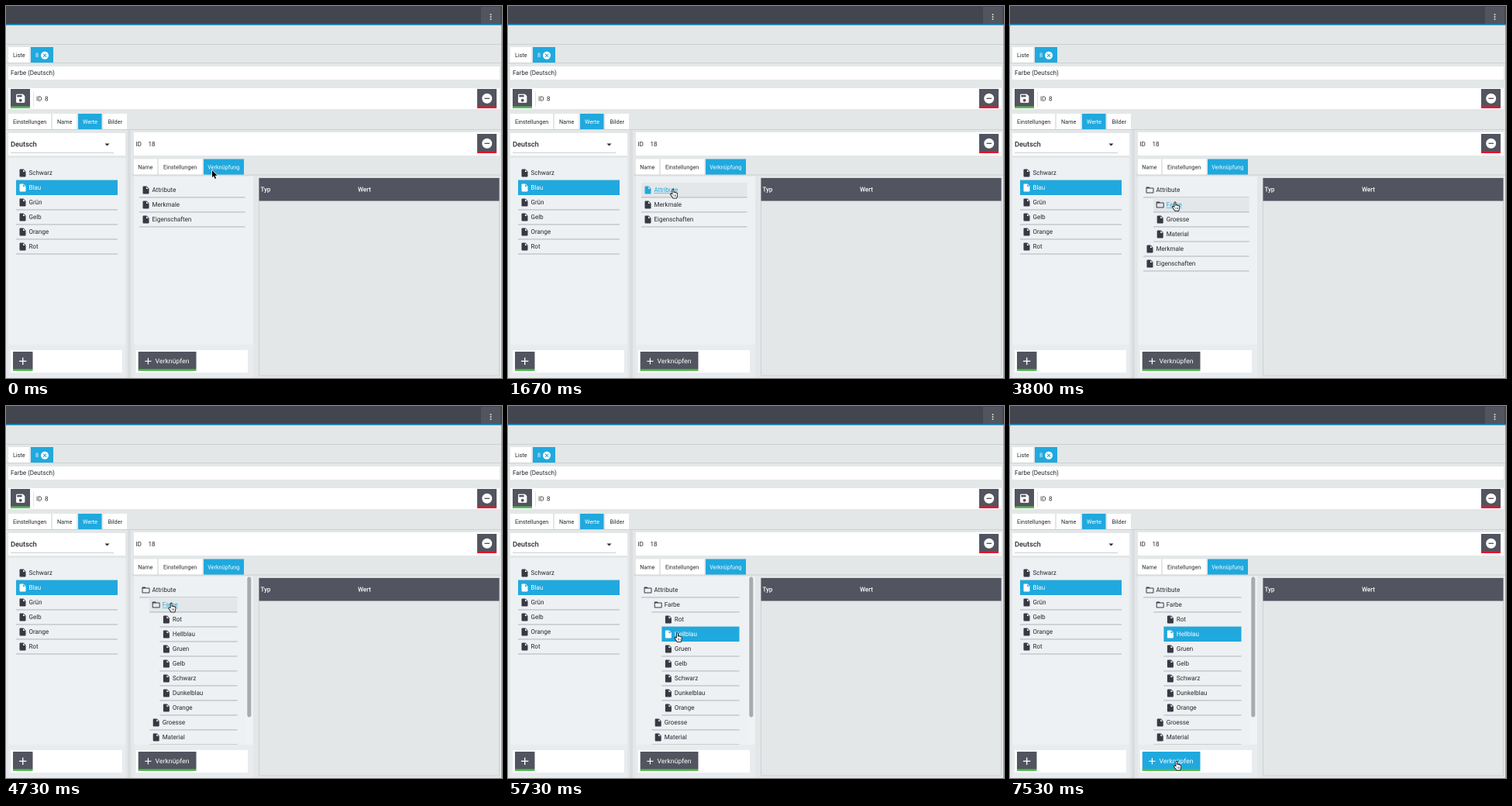
An HTML page with a canvas for the animation above (8000 ms loop, 640 by 480 pixels).

```html
<!DOCTYPE html>
<html lang="de">
<head>
<meta charset="utf-8">
<title>Verknüpfung</title>
<style>
html, body { margin: 0; width: 100%; height: 100%; overflow: hidden; background: #e3e7e8; }
canvas { display: block; width: 640px; height: 480px; }
</style>
</head>
<body>
<canvas id="stage" width="1280" height="960"></canvas>
<script>
const ctx = document.getElementById('stage').getContext('2d');
ctx.scale(2, 2); // drawn at double size for soft, unhinted text
const BLUE = '#20a9de', DARK = '#52545f', INK = '#27282d', SIGN = '#383a43', BACK = '#e3e7e8',
  PANEL = '#edf1f4', LINE = '#abaeb1', EDGE = '#cdd1d3', GREEN = '#55bd52', RED = '#e8122b';
const FPS = 15, FRAMES = 120;

// Icons on a 24 unit grid
const ICON = {
  file: 'M6 2c-1.1 0-2 .9-2 2v16c0 1.1.9 2 2 2h12c1.1 0 2-.9 2-2V8l-6-6H6zm7 7V3.5L18.5 9H13z',
  folder: 'M20 6h-8l-2-2H4c-1.1 0-2 .9-2 2v12c0 1.1.9 2 2 2h16c1.1 0 2-.9 2-2V8c0-1.1-.9-2-2-2zm0 12H4V8h16v10z',
  save: 'M17 3H5c-1.1 0-2 .9-2 2v14c0 1.1.9 2 2 2h14c1.1 0 2-.9 2-2V7l-4-4zm-5 16a3 3 0 1 1 0-6 3 3 0 0 1 0 6zm3-10H5V5h10v4z',
  minus: 'M12 2a10 10 0 1 0 0 20 10 10 0 0 0 0-20zm5 11H7v-2h10v2z',
  plus: 'M19 13h-6v6h-2v-6H5v-2h6V5h2v6h6v2z',
  close: 'M12 2a10 10 0 1 0 0 20 10 10 0 0 0 0-20zm5 13.6L15.6 17 12 13.4 8.4 17 7 15.6 10.6 12 7 8.4 8.4 7 12 10.6 15.6 7 17 8.4 13.4 12z',
  dots: 'M12 8a2 2 0 1 0 0-4 2 2 0 0 0 0 4zm0 2a2 2 0 1 0 0 4 2 2 0 0 0 0-4zm0 6a2 2 0 1 0 0 4 2 2 0 0 0 0-4z'
};
for (const k in ICON) ICON[k] = new Path2D(ICON[k]);
const HAND = new Path2D('M3 7V1.3a.9.9 0 0 1 1.8 0V5l.2-.5a.8.8 0 0 1 1.5.2l.2.3a.8.8 0 0 1 1.4.3l.2.2a.8.8 0 0 1 1.3.6V8.5L8.6 12H4L.7 7.5a.9.9 0 0 1 1.3-1.2z');
const ARROW = new Path2D('M0 0V9.2L2.1 7.3 3.7 11 5.2 10.4 3.6 6.8H6.5z');

// Pointer moves: first and last frame, end point, time warp, sideways bow
const START = { x: 266, y: 212 };
const MOVES = [
  { from: 15, to: 25, x: 213, y: 236, warp: 1, bow: 0 },
  { from: 47, to: 51, x: 213, y: 252.5, warp: 1, bow: 0 },
  { from: 71, to: 79, x: 218.5, y: 292.5, warp: 1, bow: 0 },
  { from: 101, to: 113, x: 215, y: 458, warp: 0.8, bow: 3.3 }
];
const OPEN_ICON = 34, OPEN = 36, SUB_ICON = 57, SUB_OPEN = 60, PICK = 86;

function box(x, y, w, h, color) {
  ctx.fillStyle = color;
  ctx.fillRect(x, y, w, h);
}

function text(s, x, y, color = INK, size = 8, weight = 400) {
  ctx.font = `${weight} ${size}px Roboto, sans-serif`;
  ctx.fillStyle = color;
  ctx.fillText(s, x, y);
}

function icon(name, x, y, size, color) {
  ctx.save();
  ctx.translate(x, y);
  ctx.scale(size / 24, size / 24);
  ctx.fillStyle = color;
  ctx.fill(ICON[name], 'evenodd');
  ctx.restore();
}

function tab(s, x, y, w, pad, active) {
  box(x, y, w, 20, active ? BLUE : '#fff');
  text(s, x + pad, y + 13, active ? '#fff' : INK, 7.25);
}

function button(x, y, w, name, size, edge, fill = DARK) {
  box(x, y, w, 25, fill);
  box(x, y + 22.5, w, 2.5, edge);
  icon(name, x + 12.7 - size / 2, y + 12.3 - size / 2, size, '#fff');
}

function row(label, x, y, right, { folder, picked, hover, faint } = {}) {
  if (picked) box(x, y - 0.3, right - x, 19.3, BLUE);
  else {
    if (hover) box(x, y, right - x, 18.5, '#e4e7e9');
    else if (faint) box(x, y, right - x, 18.5, '#f1f2f3');
    box(x, y + 18.5, right - x, 0.9, LINE);
  }
  const color = picked ? '#fff' : hover ? BLUE : null;
  icon(folder ? 'folder' : 'file', x + 2.5, y + 3.5, 12, folder ? SIGN : color || SIGN);
  text(label, x + 16.5, y + 12, color || INK);
  if (hover && !picked) box(x + 16.5, y + 13, ctx.measureText(label).width, 0.6, BLUE);
}

function pointer(n) {
  let p = START;
  for (const m of MOVES) {
    if (n < m.from) break;
    const u = Math.min(1, (n - m.from + 1) / (m.to - m.from + 1)) ** m.warp;
    const e = u * u * (3 - 2 * u);
    p = { x: p.x + (m.x - p.x) * e + m.bow * 4 * e * (1 - e), y: p.y + (m.y - p.y) * e };
  }
  return p;
}

function treeRows(n) {
  const rows = [['Attribute', 0, n >= OPEN_ICON]];
  if (n >= OPEN) {
    rows.push(['Farbe', 1, n >= SUB_ICON]);
    if (n >= SUB_OPEN) {
      for (const s of ['Rot', 'Hellblau', 'Gruen', 'Gelb', 'Schwarz', 'Dunkelblau', 'Orange']) rows.push([s, 2]);
    }
    rows.push(['Groesse', 1], ['Material', 1]);
  }
  rows.push(['Merkmale', 0], ['Eigenschaften', 0]);
  return rows;
}

const rowAt = p => p.y >= 228 && p.y < 437 ? Math.floor((p.y - 228) / 19) : -1;

function drawHeader() {
  box(0, 0, 640, 480, BACK);
  box(0, 0, 640, 24, '#43454f');
  box(613, 1, 25, 22, '#52545e');
  icon('dots', 619.5, 8, 12, '#dfe0e2');
  box(0, 23.5, 640, 1.5, BLUE);
  box(0, 49, 640, 1, EDGE);
  tab('Liste', 3, 53, 27, 6, false);
  tab('8', 32, 53, 29, 6, true);
  icon('close', 44, 57.8, 12, '#fff');
  box(0, 73, 640, 1, EDGE);
  box(3, 78, 634, 17, '#fff');
  text('Farbe (Deutsch)', 6, 89);

  box(3, 106, 634, 27, '#fff');
  button(6, 107, 25, 'save', 15, GREEN);
  box(35, 110, 0.6, 20, EDGE);
  text('ID', 39, 122.5);
  text('8', 50, 122.5);
  button(608, 107, 25, 'minus', 15.5, RED);

  tab('Einstellungen', 3, 139, 55, 6, false);
  tab('Name', 60, 139, 31, 6, false);
  tab('Werte', 93, 139, 30.5, 6, true);
  tab('Bilder', 125.5, 139, 30.5, 6, false);
  box(0, 159, 640, 1, EDGE);
}

function drawLeft() {
  box(3, 164, 151, 29, '#fff');
  text('Deutsch', 6, 181.5, INK, 9.2, 500);
  ctx.beginPath();
  ctx.moveTo(127.5, 177.5);
  ctx.lineTo(133.5, 177.5);
  ctx.lineTo(130.5, 180.5);
  ctx.fill();
  box(6, 189.5, 133, 0.5, '#9a9da1');
  box(3, 196, 151, 241, PANEL);
  ['Schwarz', 'Blau', 'Grün', 'Gelb', 'Orange', 'Rot'].forEach((s, i) =>
    row(s, 13, 206 + 19 * i, 144, { picked: s === 'Blau' }));
  box(3, 437, 151, 43, '#e8ecee');
  box(6, 444, 144, 29, '#fff');
  button(9, 446, 25.5, 'plus', 16, GREEN);
  box(157, 160, 4, 320, '#d9dddf');
}

function drawRight() {
  box(165, 163, 472, 30, '#fff');
  text('ID', 167.5, 181);
  text('18', 183.5, 181);
  button(608, 165, 25, 'minus', 15.5, RED);
  tab('Name', 165, 197.5, 30, 5.2, false);
  tab('Einstellungen', 197, 197.5, 56, 6, false);
  tab('Verknüpfung', 255, 197.5, 52, 5.2, true);
  box(162, 217.5, 478, 1, EDGE);

  box(326, 221.5, 311, 256, EDGE);
  box(327, 251, 309, 225.5, BACK);
  box(326.5, 222, 310, 29.5, DARK);
  text('Typ', 328.5, 239.5, '#fff', 8, 500);
  text('Wert', 454, 239.5, '#fff', 8, 500);
}

function drawTree(n, p) {
  const scroll = n >= SUB_OPEN;
  const over = rowAt(p), before = rowAt(pointer(n - 1));
  box(165, 220, 154, 217, PANEL);
  ctx.save();
  ctx.beginPath();
  ctx.rect(165, 220, 154, 217);
  ctx.clip();
  treeRows(n).forEach(([label, level, folder], i) =>
    row(label, 172 + 13.2 * level, 228 + 19 * i, scroll ? 298.5 : 308.5, {
      folder, hover: i === over, faint: i === before,
      picked: label === 'Hellblau' && n >= PICK
    }));
  ctx.restore();
  if (scroll) {
    box(309, 220, 9, 217, '#f0f3f4');
    ctx.fillStyle = '#a8abad';
    ctx.beginPath();
    ctx.roundRect(311.3, 220.5, 5, 181, 2.5);
    ctx.fill();
  }
  box(165, 437, 154, 43, '#e8ecee');
  box(168, 444, 144, 29, '#fff');
  button(170.7, 446, 74.8, 'plus', 14, GREEN, p.y >= 446 ? BLUE : DARK);
  text('Verknüpfen', 192.5, 461.2, '#fff', 8.7);
}

function drawPointer(p) {
  const hand = p.y >= 228 && (p.y < 437 || p.y >= 446);
  const shape = hand ? HAND : ARROW;
  ctx.save();
  ctx.translate(p.x - (hand ? 4 : 0), p.y);
  ctx.lineJoin = 'round';
  ctx.lineWidth = hand ? 0.9 : 1.4;
  ctx.strokeStyle = hand ? '#111' : '#fff';
  ctx.fillStyle = hand ? '#fff' : '#000';
  ctx.stroke(shape);
  ctx.fill(shape);
  if (hand) {
    ctx.lineWidth = 0.7;
    ctx.stroke(shape);
    ctx.fillStyle = '#333';
    for (const x of [4.6, 6, 7.4]) ctx.fillRect(x, 7.4, 0.5, 2.6);
  }
  ctx.restore();
}

function draw(now) {
  const n = Math.floor(now * FPS / 1000 + 0.1) % FRAMES;
  const p = pointer(n);
  drawHeader();
  drawLeft();
  drawRight();
  drawTree(n, p);
  box(639.2, 25, 0.8, 455, '#8a8d90');
  drawPointer(p);
}

const begin = performance.now();
function tick() {
  draw(performance.now() - begin);
  requestAnimationFrame(tick);
}
tick();
</script>
</body>
</html>
```
